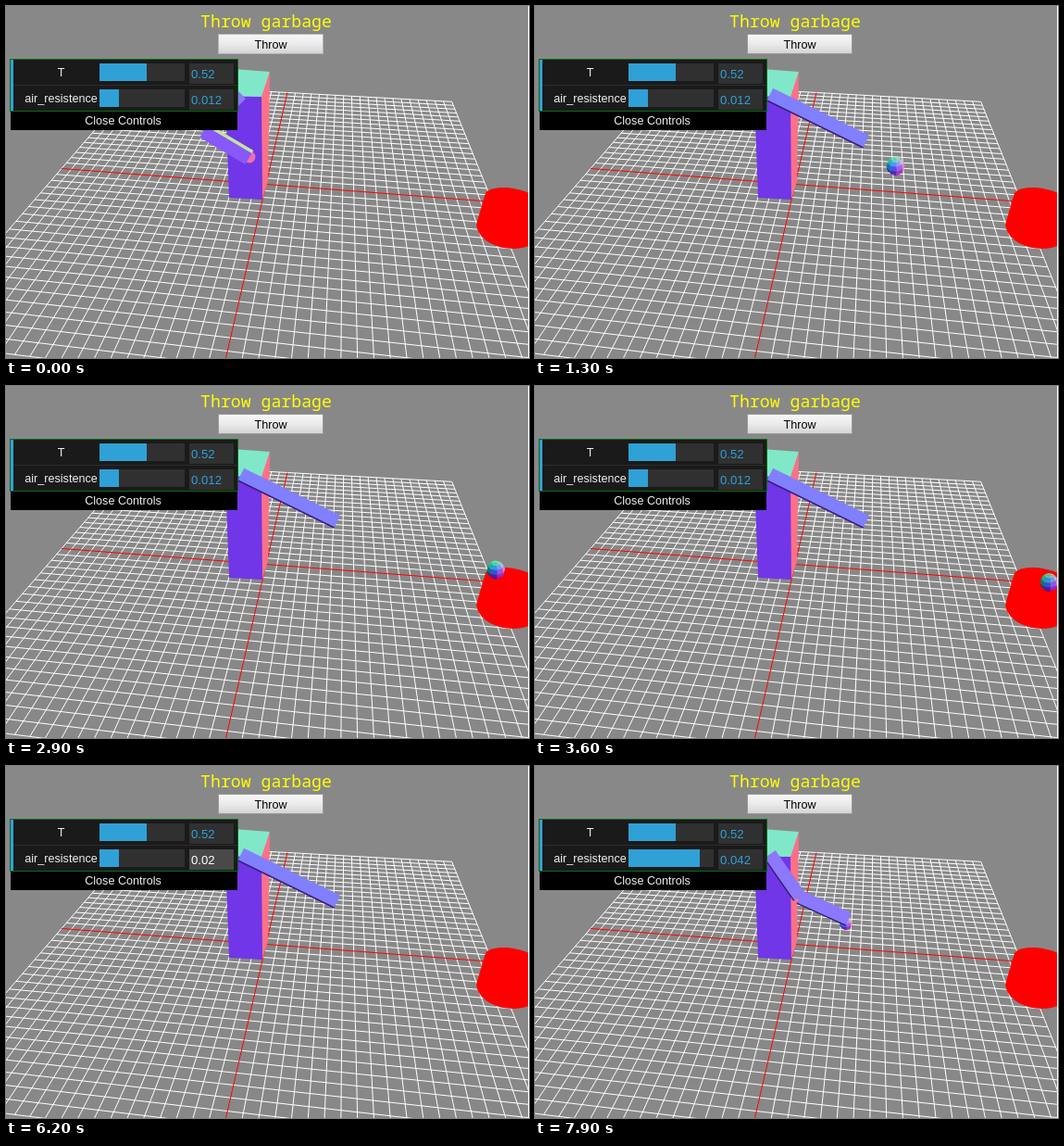
Recreate the animation shown at these times as an HTML page with a canvas. Size 565 by 380 pixels, loop 8000 ms.

```html
<!DOCTYPE html>
<html lang="en">
<head>
<meta charset="utf-8">
<title>Throw garbage</title>
<style>
  html, body { margin: 0; height: 100%; overflow: hidden; background: #888; }
  canvas { display: block; }
</style>
</head>
<body>
<canvas id="stage" width="565" height="380"></canvas>
<script>
const ctx = document.getElementById('stage').getContext('2d');
const LOOP = 8000, STEP = 100;
const SANS = '"Liberation Sans", Arial, sans-serif';
const BLUE = '#2fa1d6';

function rect(x, y, w, h, color) {
  ctx.fillStyle = color;
  ctx.fillRect(x, y, w, h);
}

function poly(points, color) {
  ctx.beginPath();
  points.forEach(([x, y]) => ctx.lineTo(x, y));
  ctx.closePath();
  ctx.fillStyle = color;
  ctx.fill();
}

function line(from, to, color) {
  ctx.beginPath();
  ctx.moveTo(...from);
  ctx.lineTo(...to);
  ctx.strokeStyle = color;
  ctx.stroke();
}

function text(str, x, y, color, size, align = 'left', family = SANS) {
  ctx.font = `${size}px ${family}`;
  ctx.textAlign = align;
  ctx.fillStyle = color;
  ctx.fillText(str, x, y);
}

// Perspective projection of the floor; u and v run from -1 to 1.
function floor(u, v) {
  const depth = 1 - 0.05 * u - 0.362 * v;
  return [(281 + 218 * u - 133 * v) / depth, (192.5 + 8.25 * u + 65.2 * v) / depth];
}

function drawGrid() {
  const half = 20;
  ctx.lineWidth = 1;
  for (let i = -half; i <= half; i++) {
    const k = i / half;
    if (!i) continue;
    line(floor(k, -1), floor(k, 1), '#fff');
    line(floor(-1, k), floor(1, k), '#fff');
  }
  line(floor(0, -1), floor(0, 1), '#f00');
  line(floor(-1, 0), floor(1, 0), '#f00');
}

function drawBody() {
  poly([[237, 97], [277, 98], [277, 209], [241, 207]], '#7036e8');
  poly([[245, 68], [285, 71], [277, 98], [237, 97]], '#80e8c8');
  poly([[285, 71], [283, 189], [277, 209], [276, 98]], '#ff7088');
}

function drawBin() {
  ctx.beginPath();
  ctx.moveTo(518, 202);
  ctx.bezierCurveTo(522, 195, 545, 193, 565, 202);
  ctx.lineTo(565, 259);
  ctx.bezierCurveTo(543, 267, 511, 258, 508, 236);
  ctx.closePath();
  ctx.fillStyle = '#f00';
  ctx.fill();
}

// Flat-shaded sphere coloured by its view-space normals, seen from above.
function drawBall(cx, cy, r) {
  const rows = 6, cols = 8, tilt = 0.61;
  const sight = (cx - 282) / 500; // angle off the camera axis
  const normal = (row, col) => {
    const lat = Math.PI * row / rows, lon = 2 * Math.PI * col / cols + 0.12;
    const x = Math.sin(lat) * Math.sin(lon), y = Math.cos(lat), z = Math.sin(lat) * Math.cos(lon);
    return [x, y * Math.cos(tilt) - z * Math.sin(tilt), y * Math.sin(tilt) + z * Math.cos(tilt)];
  };
  for (let row = 0; row < rows; row++) {
    for (let col = 0; col < cols; col++) {
      const [nx, ny, nz] = normal(row + 0.5, col + 0.5);
      if (nz < -0.1) continue;
      const corners = [[0, 0], [0, 1], [1, 1], [1, 0]].map(([a, b]) => {
        const [x, y] = normal(row + a, col + b);
        return [cx + r * x, cy - r * y];
      });
      const seen = [
        nx * Math.cos(sight) - nz * Math.sin(sight), ny,
        nx * Math.sin(sight) + nz * Math.cos(sight)];
      poly(corners, `rgb(${seen.map(c => Math.round(127.5 + 127.5 * c))})`);
    }
  }
}

// A bar between two joints with a thin side face along one edge.
function limb([x1, y1], [x2, y2], width, color, edgeColor, edgeWidth) {
  const len = Math.hypot(x2 - x1, y2 - y1);
  const nx = -(y2 - y1) / len, ny = (x2 - x1) / len;
  const strip = (a, b) => [
    [x1 + nx * a, y1 + ny * a], [x2 + nx * a, y2 + ny * a],
    [x2 + nx * b, y2 + ny * b], [x1 + nx * b, y1 + ny * b]];
  const half = width / 2, side = Math.sign(edgeWidth);
  poly(strip(side * half - side, side * half + edgeWidth), edgeColor);
  poly(strip(-half, half), color);
}

const SHOULDER = [254, 95];
const SWING = [
  { elbow: [213, 136], hand: [262, 165] },
  { elbow: [222, 141], hand: [273, 168] },
  { elbow: [253, 150], hand: [307, 169] },
  { elbow: [286, 141], hand: [339, 165] }
];

function drawArm(step) {
  if (step >= SWING.length) {
    limb(SHOULDER, [358, 146], 14, '#8080ff', '#3c1c80', 1.6);
    return;
  }
  const { elbow, hand } = SWING[step];
  const back = step < 2;
  limb(SHOULDER, elbow, 14, '#8c78fa', '#302070', 1.5);
  if (back) {
    ctx.beginPath();
    ctx.arc(hand[0] + 1, hand[1] - 2, 6.5, 0, 7);
    ctx.fillStyle = '#f070a8';
    ctx.fill();
  } else {
    drawBall(hand[0] - 3, hand[1] + 5, 7);
  }
  limb(elbow, hand, 14, back ? '#8858fc' : '#8c78fe',
    back ? '#c4e69a' : '#302078', back ? -3.5 : 1.5);
}

function drawButton(t) {
  const calm = t < 500 || (t >= 6500 && t < 7300);
  const shade = ctx.createLinearGradient(0, 30, 0, 52);
  shade.addColorStop(0, '#f8f8f8');
  shade.addColorStop(0.5, '#ebebeb');
  shade.addColorStop(1, '#d2d2d2');
  rect(229, 30, 114, 22, calm ? '#b4b4b4' : '#9a9a9a');
  rect(230, 31, 112, 20, shade);
  text('Throw', 286, 46, '#000', 12.6, 'center');
}

function drawRow(y, label, labelX, value, fill, box, color) {
  rect(5, y, 245, 28, '#1a1a1a');
  rect(5, y + 27, 245, 1, '#2c2c2c');
  rect(5, y, 3, 28, BLUE);
  text(label, labelX, y + 18, '#eee', 12.6, 'center');
  rect(101, y + 4, 92, 19, '#303030');
  rect(101, y + 4, fill, 19, BLUE);
  rect(198, y + 4, 48, 22, box);
  text(value, 200, y + 20, color, 13.2);
}

function drawPanel(t) {
  const editing = t >= 4600 && t < 7300;
  const hover = t >= 4000 && t < 4600;
  const value = t < 5600 ? '0.012' : t < 6700 ? '0.02' : '0.042';
  const box = editing ? '#494949' : hover ? '#3c3c3c' : '#303030';
  drawRow(58, 'T', 59.5, '0.52', 51, '#303030', BLUE);
  drawRow(86, 'air_resistence', 59.5, value, t < 7300 ? 21 : 77, box, editing ? '#fff' : BLUE);
  if ((t >= 4600 && t < 5100) || (t >= 6800 && t < 7300)) rect(226, 93, 1, 16, '#fff');
  if (t >= 5700 && t < 6200) rect(219, 93, 1, 16, '#fff');
  rect(5, 114, 245, 20, '#000');
  text('Close Controls', 126.5, 128, '#eee', 12.6, 'center');
  ctx.lineWidth = 1;
  ctx.strokeStyle = '#0a6a14';
  ctx.strokeRect(4.5, 57.5, 246, 56);
}

function draw(t) {
  rect(0, 0, 565, 380, '#888');
  drawGrid();
  drawBody();

  const swingStep = t < 800 ? 0 : t < 7700 ? (t - 700) / STEP : (t - 7600) / STEP;
  drawArm(swingStep);
  drawBin();

  // Flight slowed by air resistance.
  if (t >= 1100 && t < 4400) {
    const n = (t - 1300) / STEP;
    drawBall(597 - 207.5 * Math.exp(-0.07 * n), 173 + 1.35 * n + 0.0152 * n * n, 10);
  }

  drawPanel(t);
  drawButton(t);
  text('Throw garbage', 281, 23, '#ff0', 18.2, 'center', '"Noto Sans Mono", monospace');
  rect(564, 0, 1, 380, '#fff');
}

function tick() {
  const t = performance.now() % LOOP;
  draw(Math.floor(t / STEP) * STEP);
  requestAnimationFrame(tick);
}
tick();
</script>
</body>
</html>
```
